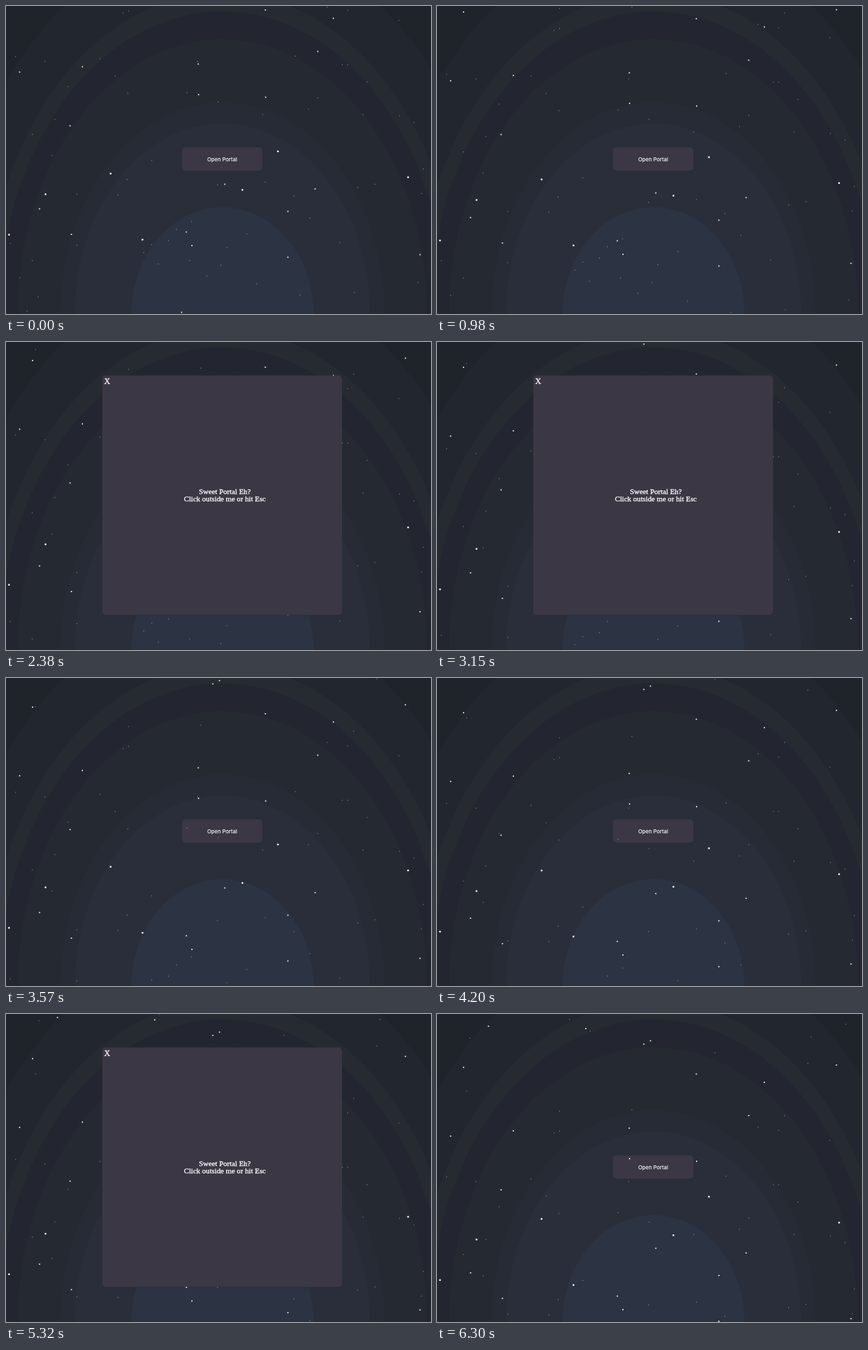
These frames come from a looping animation (640x464 px, 6370 ms). An HTML page:

```html
<!DOCTYPE html>
<html lang="en">
<head>
<meta charset="utf-8">
<title>Portal</title>
<style>
  html, body { margin: 0; width: 100%; height: 100%; overflow: hidden; background: #1f242b; }
  svg { display: block; width: 640px; height: 464px; }
  text { fill: #fff; }
  .label { font: 500 8px Inter, sans-serif; text-anchor: middle; }
  .note, .close { font: 11.35px "Liberation Serif", Times, serif; stroke: #fff; stroke-width: .3; }
  .note { text-anchor: middle; }
  .close { font-size: 12px; }
</style>
</head>
<body>
<svg viewBox="0 0 640 464" xmlns="http://www.w3.org/2000/svg">
  <clipPath id="pill"><rect x="265" y="213" width="121" height="35" rx="5"/></clipPath>
  <g id="sky"></g>
  <g clip-path="url(#pill)">
    <rect x="265" y="213" width="121" height="35" fill="#3c3745"/>
    <circle id="ripple" cx="299" cy="240" fill="#fff" opacity=".085"/>
  </g>
  <text class="label" x="325.5" y="233.6">Open Portal</text>
  <g id="stars" fill="#fff"></g>
  <g id="modal">
    <rect x="145" y="50.5" width="361" height="360.5" rx="5" fill="#3c3745"/>
    <text class="close" x="148" y="63">X</text>
    <text class="note" x="329.5" y="228.5">Sweet Portal Eh?</text>
    <text class="note" x="329.5" y="240">Click outside me or hit Esc</text>
  </g>
</svg>
<script>
const NS = 'http://www.w3.org/2000/svg';
const LOOP = 6370, STEP = 70, SPEED = 26.8;
const $ = id => document.getElementById(id);

function add(parent, tag, attrs) {
  const el = document.createElementNS(NS, tag);
  for (const k in attrs) el.setAttribute(k, attrs[k]);
  return parent.appendChild(el);
}

// Glow rising from the bottom edge, outermost band first
function band(ry, fill) {
  add($('sky'), 'ellipse', { cx: 326, cy: 464, rx: ry * .675 + 28.5, ry, fill });
}
band(569, '#22262e');
band(484, '#262a31');
band(456, '#232630');
band(414, '#252a32');
band(319, '#272b36');
band(287, '#2a2e3a');
band(161, '#2c3342');

function random(seed) {
  return () => (seed = seed * 16807 % 2147483647) / 2147483647;
}

// Faint stars, including those that drift in from above
function scatter(count, seed) {
  const rnd = random(seed);
  return Array.from({ length: count }, () => [
    Math.floor(rnd() * 640), Math.floor(rnd() * 634) - 170
  ]);
}

// The brighter stars are landmarks
const big = [[59, 283], [157, 252], [409, 218.5], [355.5, 276.5], [605, 257.5], [205, 351.5], [4, 344]];
const medium = [
  [390, 5.5], [492.5, 18], [469, 68], [20, 99], [114.5, 91], [289, 87], [289.5, 133],
  [390.5, 137], [96, 180], [329, 268], [465, 275], [50, 305], [98, 343.5], [271, 340],
  [279.5, 360.5], [424, 309], [424, 378], [623, 374], [264, 461], [39.5, -4.5],
  [601, -8], [311, -39.5], [321, -44.5], [223.5, -63], [77, -66.5]
];

// Larger stars drift more slowly
function layer(points, depth, size, opacity) {
  const g = add($('stars'), 'g', { opacity });
  for (const [x, y] of points)
    add(g, 'rect', {
      x: x + .5 - size / 2, y: y + .5 - size / 2, width: size, height: size
    });
  return { g, speed: SPEED / depth };
}
const layers = [
  layer(scatter(72, 4021), 1, 1.1, .5),
  layer(medium, 2, 1.8, .95),
  layer(big, 3, 2.4, 1)
];

// Each visit: press, open and close times
const visits = [
  { press: 1050, open: 1400, close: 3430 },
  { press: 4620, open: 4970, close: 5880 }
];

function draw(ms) {
  const t = Math.floor(ms % LOOP / STEP) * STEP;
  for (const { g, speed } of layers)
    g.setAttribute('transform', `translate(0 ${(speed * t / 1000).toFixed(2)})`);
  const pressed = visits.find(v => t >= v.press && t < v.open);
  $('ripple').setAttribute('r', pressed ? (t - pressed.press) * .35 : 0);
  const open = visits.some(v => t >= v.open && t < v.close);
  $('modal').setAttribute('visibility', open ? 'visible' : 'hidden');
}

const start = performance.now();
function tick() {
  draw(performance.now() - start);
  requestAnimationFrame(tick);
}
draw(0);
requestAnimationFrame(tick);
</script>
</body>
</html>
```
